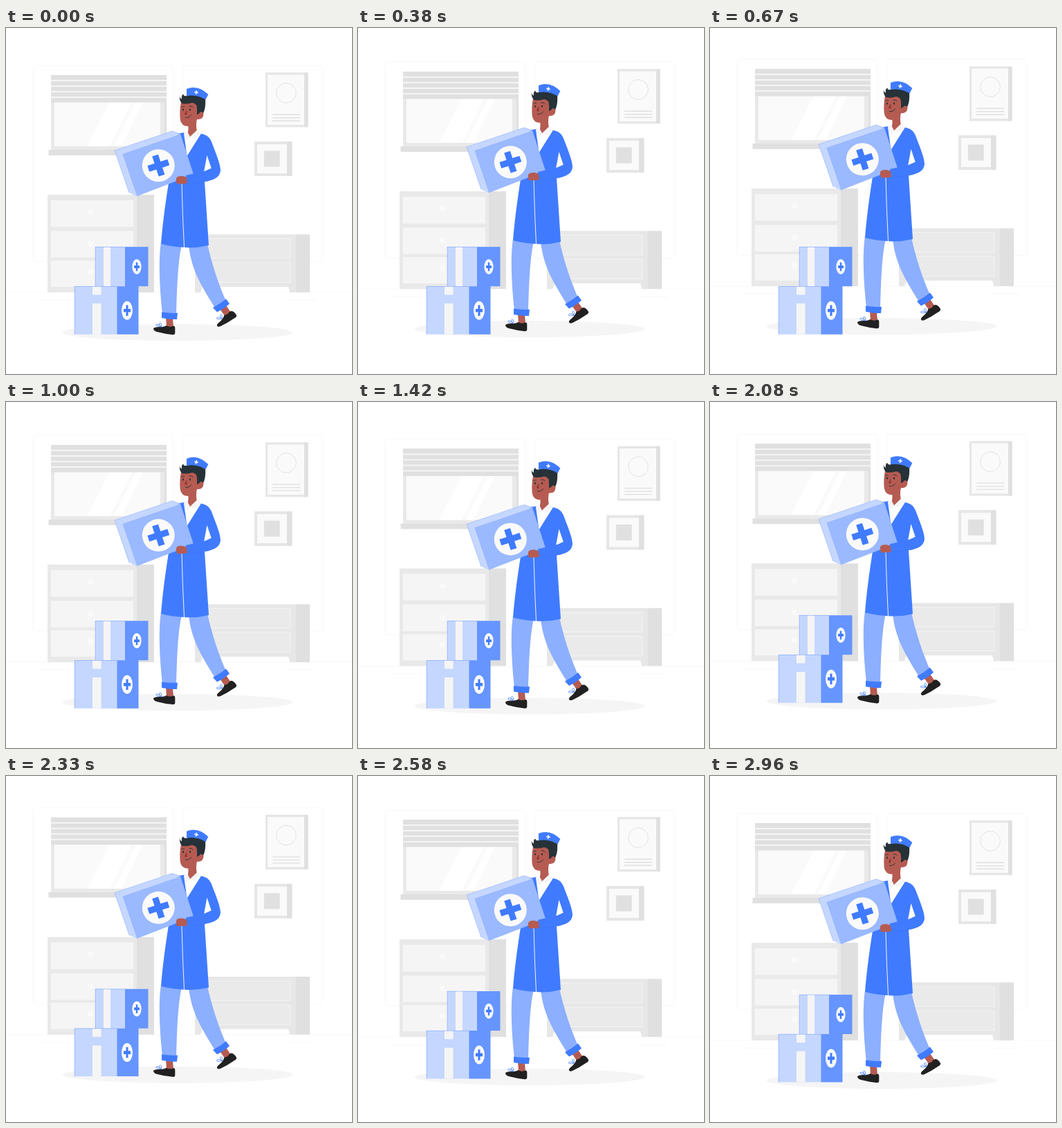
These frames come from a looping animation (500 px wide and 500 px high, 3000 ms). An HTML page:

```html
<!DOCTYPE html>
<html lang="en">
<head>
<meta charset="utf-8">
<title>Medical delivery</title>
<style>
html, body { margin: 0; height: 100%; overflow: hidden; background: #fff }
svg { display: block; width: 100%; height: 100% }
.blue { fill: #407bff }
.pants { fill: #8cafff }
.pale { fill: #c5d7ff }
.side { fill: #6695ff }
.skin { fill: #b55b52 }
.dark { fill: #263238 }
.shoe { fill: #212121 }
.g1 { fill: #fafafa }
.g2 { fill: #f5f5f5 }
.g3 { fill: #e9e9e9 }
.g4 { fill: #e0e0e0 }
.line { fill: none; stroke-linecap: round; stroke-linejoin: round }
</style>
</head>
<body>
<svg viewBox="0 0 500 500">
<defs>
  <path id="cross" d="M-1.5-5h3v3.5H5v3H1.5V5h-3V1.5H-5v-3h3.5z"/>
</defs>
<g id="scene">
  <g fill="none" stroke="#ebebeb" stroke-width=".35">
    <rect x="39" y="54.3" width="203" height="283" rx="4"/>
    <rect x="255" y="54.3" width="203" height="283" rx="4"/>
    <path d="M0 382.2H500M49 393.3H93M408 393.3H448"/>
  </g>

  <!-- window -->
  <path class="g3" d="M65 68H230V176H65z"/>
  <path class="g4" d="M229 68h3v108h-3zM61.500 176H235v8H61.500z"/>
  <path class="g1" d="M70 75H223V171H70z"/>
  <path fill="#fff" d="M150 107h32L150 171H117zM188 107h10L167 171H156z"/>
  <path class="g2" d="M65 70H232V106H65z"/>
  <path class="g4" d="M65 68H232v7H65zM65 77H232v6H65zM65 85H232v6H65zM65 93H232v6H65zM65 101H232v6.500H65z"/>

  <!-- wall frames -->
  <path fill="#e6e6e6" d="M375 64.300h57v79h-57zM359 164h48v50h-48z"/>
  <path class="g4" d="M431 64.300h5.700v79H431zM406 164h7.500v50H406z"/>
  <path class="g1" d="M378 67.500h53v72.500h-53zM363 168h43v42h-43z"/>
  <circle cx="405" cy="94" r="14.300" fill="none" stroke="#e0e0e0" stroke-width=".9"/>
  <path class="g4" d="M385 124.500h40v1.400h-40zM385 129h40v1.400h-40zM385 133.500h40v1.400h-40zM372.700 177.500h23v23h-23z"/>

  <!-- cabinets -->
  <path class="g3" d="M60 241H190V382H60z"/>
  <path class="g4" d="M189 241h25v141h-25z"/>
  <path class="g2" d="M65 249H184v38.500H65zM65 293.300H184v38.500H65zM65 336H184v38H65z"/>
  <g class="g1">
    <circle cx="122" cy="266" r="4"/><circle cx="122" cy="312" r="4"/><circle cx="122" cy="352" r="4"/>
  </g>
  <path fill="#e7e7e7" d="M273 298.300H420V382H410L408 374H284L281 382H273z"/>
  <path class="g4" d="M419 298.300h20V382h-20z"/>
  <path fill="#eaeaea" stroke="#f4f4f4" d="M281 304.300H411v28.500H281zM281 339H411v28.500H281z"/>

  <ellipse class="g2" cx="248" cy="440" rx="166.500" ry="12"/>

  <!-- legs -->
  <path class="skin" d="M231 418L241 419L242 433L232 432zM309 406L318 401L325 411L316 416z"/>
  <path class="shoe" d="M213 434Q215 432 222 432Q229 432 231.500 430Q237 433 242 430.500Q244 430 244.300 433V441Q244 443.500 241 443.200Q229 442 218 439Q213 437.500 213 434z"/>
  <path class="shoe" d="M305 430.500Q304 428 309 424.500Q314 420 315.500 415Q321 414 322.500 410.500Q325 408 328 409.500Q332 412 333.300 415.500Q333 418 329 420Q319 427 310 431Q306 432.500 305 430.500z"/>
  <path class="line" stroke="#407bff" stroke-width=".8" d="M224 432Q216 431 217 428.500Q220 427 224 432Q220 427 222.500 426Q226 427 224 432M312 420Q304 422 304.500 419Q307 416.500 312 420Q308 415 310.500 414Q313.500 414 312 420"/>
  <path class="pants" d="M264 314C268 350 282 372 303 406L318 395C307 370 298 343 291 312z"/>
  <path class="pants" d="M224 310C220 335 222 375 226 413L246 414C247 378 248 340 254 313z"/>
  <path class="blue" d="M225 410.500Q236 412.500 248 411.800L247 421Q236 421.500 225 419zM299 404Q309 399 318 391.500L323 398.500Q314 406.500 305 410.500z"/>

  <!-- coat -->
  <path class="blue" d="M248 152.500L258 151L262 184L281 152.500C290 154 295 158 298 167C304 183 310 197 310 206C309 216 300 220 287 222L293 314Q275 318.500 257 317Q238 316 224 312C226 286 230 255 235 224L258 205z"/>
  <path fill="#fff" d="M257 152L263 148H277L282 152.500L261.500 185zM290.500 184L297 203.500L286 208Z"/>
  <path class="line" stroke="#fff" stroke-width=".9" d="M254 224Q255 270 257.500 317"/>
  <path class="line" stroke="#346ae0" stroke-width=".8" d="M262 224Q275 225 287 221.500"/>

  <!-- head -->
  <path class="skin" d="M263 137L276 130Q274 142 276 149Q271 155 265 158Q262 154 263 150Q264 146 263 137z"/>
  <path class="g2" d="M257 152L262 149.500L266 157L261 163.500zM276 147.500L282 152.500L272 160L266 157z"/>
  <path class="skin" d="M253 107Q250.500 119 251.700 132Q253 142 264 142Q272 141.500 276 132Q285 133 285.500 124Q285 119 280 119L278 104z"/>
  <path class="dark" d="M251 97.500Q251 102 254 102.500Q253 98 256 95.500Q257 99 261 98C270 95 285 96 288 101C288.600 109 288 118 285 123Q282 119 279 123.500L276 125Q276.500 118 275.500 112Q273 108.500 269 108Q261 110.500 254 109Q250 104 251 97.500z"/>
  <path class="blue" d="M261 98V88Q272 83.500 283 89Q288 92 292.300 96L288.500 103.500Q276 95.500 261 98z"/>
  <use href="#cross" fill="#fff" transform="translate(275 93) rotate(10) scale(.56)"/>
  <g class="dark">
    <ellipse cx="256" cy="118" rx="1.100" ry="1.600"/><ellipse cx="266" cy="118" rx="1.100" ry="1.600"/>
  </g>
  <path fill="#8f352e" d="M261 118L258 124.500Q259.500 126 261.500 125z"/>
  <path class="line" stroke="#263238" stroke-width=".9" d="M253.500 114.500Q255 112.500 257.500 113.500M265 113Q268.500 112 270 114.500M259.500 129.500Q265 130 267.500 126"/>

  <!-- carried box -->
  <path fill="#9ab9ff" d="M168 182L252 153L271 211.500L189 243.300z"/>
  <path class="pale" d="M157 177L240 149L252 153L168 182L189 243.300L178 238z"/>
  <path class="line" stroke="#8cafff" stroke-width=".6" d="M178 238L157 177L240 149L252 153"/>
  <circle cx="220.300" cy="198.700" r="23.500" class="g1"/>
  <use href="#cross" class="blue" transform="translate(220.300 198.700) rotate(-18) scale(3.050)"/>
  <path class="blue" d="M260 213L288 206.500L298 202L308 210Q302 220 287 222Q275 224 261 224.500z"/>
  <path class="skin" d="M246 217Q248 213.500 254 214Q260 214 261 217L262 224Q256 226 247 225Q245 221 246 217z"/>
</g>

<g id="boxes">
  <path class="pale" d="M129 316.300h43.500v57H129zM99 373.300h62v69.400H99z"/>
  <path class="side" d="M172 316.300h33.500v57H172zM160.500 373.300h31v69.400h-31z"/>
  <path class="g2" d="M141 316.300h10v57h-10zM125 373.300h12.500v12.200H125zM125 398h12.500v44.700H125z"/>
  <path class="line" stroke="#6695ff" stroke-width=".5" d="M129.200 373V316.500H172M99.200 442.500V373.500H160"/>
  <ellipse class="g1" cx="189" cy="345" rx="6.600" ry="11"/>
  <ellipse class="g1" cx="175" cy="408.200" rx="8" ry="13.500"/>
  <use href="#cross" class="blue" transform="translate(189 345) scale(.8 1.250)"/>
  <use href="#cross" class="blue" transform="translate(175 408.200) scale(1 1.550)"/>
</g>
</svg>
<script>
const LOOP = 3000, FLOAT = 1500, FPS = 24, RISE = 10;
const scene = document.getElementById('scene');
const boxes = document.getElementById('boxes');

// linear rise and fall, one float per FLOAT ms
const lift = t => RISE * (1 - Math.abs(1 - 2 * (t % FLOAT) / FLOAT));
const shift = (el, y) => el.setAttribute('transform', `translate(0 ${y.toFixed(3)})`);

function draw(now) {
  const frame = Math.floor((now % LOOP + 4) * FPS / 1000) % (LOOP * FPS / 1000);
  const t = (frame + 0.5) * 1000 / FPS;
  shift(scene, 0.28 - lift(t));
  shift(boxes, t < FLOAT ? 0 : -lift(t));  // the stack waits for the second float
}

const start = performance.now();
function tick() {
  draw(performance.now() - start);
  requestAnimationFrame(tick);
}
tick();
</script>
</body>
</html>
```
